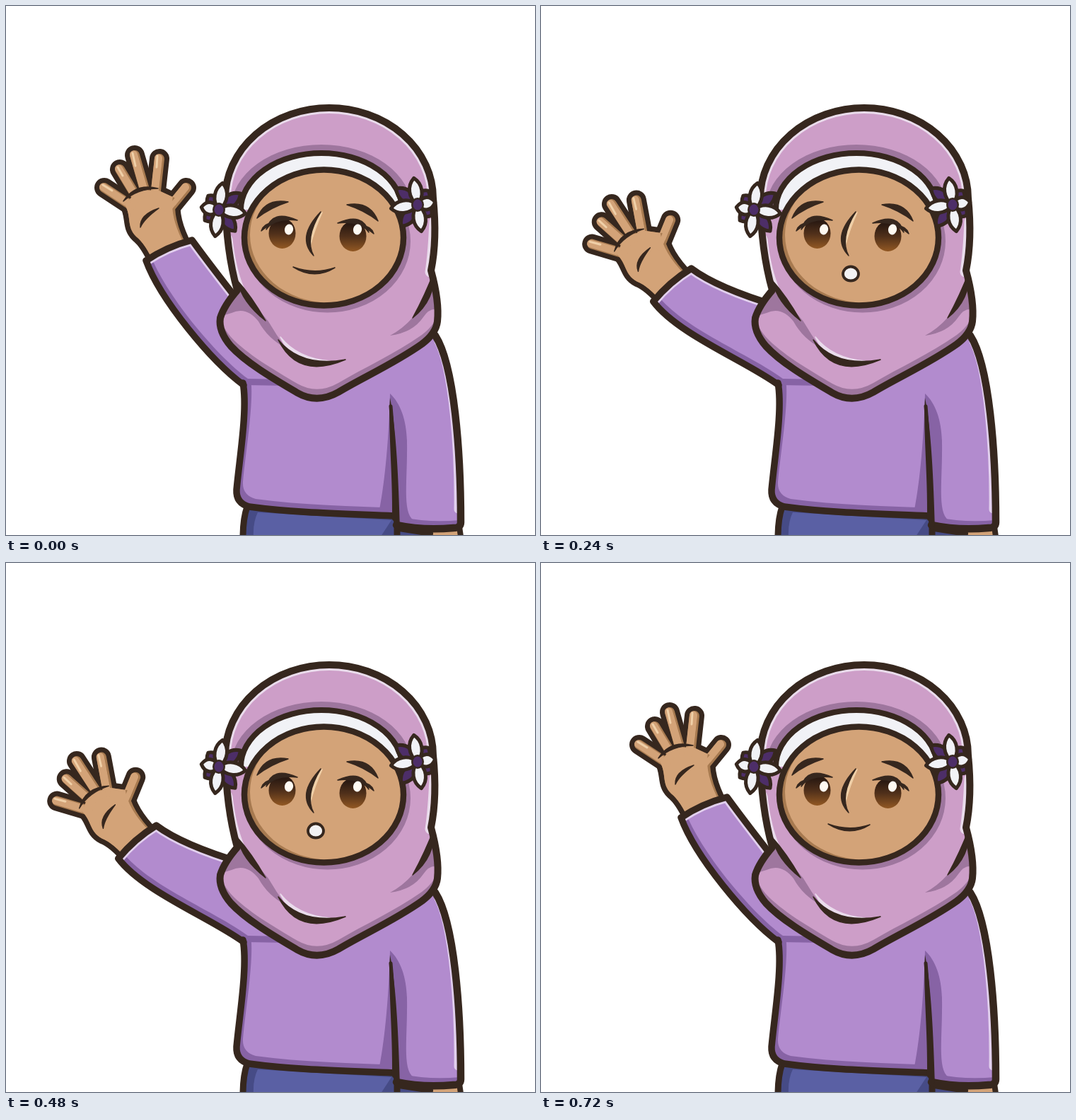
Animation, 748 px wide and 748 px high, one loop 840 ms. Source, as an HTML page with a canvas:

```html
<!DOCTYPE html>
<html lang="en">
<head>
<meta charset="utf-8">
<title>Waving girl</title>
<style>
  html, body { margin: 0; width: 100%; height: 100%; overflow: hidden; background: #fff; }
  canvas { display: block; }
</style>
</head>
<body>
<canvas id="stage" width="748" height="748"></canvas>
<script>
const ctx = document.getElementById('stage').getContext('2d');
const INK = '#36271e', SKIN = '#d3a378', SKIN_SHADE = '#a77a50', SKIN_LIGHT = '#f0d0a8';
const SWEATER = '#b28bce', SWEATER_SHADE = '#8763a5', SWEATER_LIGHT = '#e2d0ee';
const SCARF = '#cd9ec8', SCARF_SHADE = '#9e769e', SCARF_LIGHT = '#eadcec';
const PLUM = '#4d2e68', WHITE = '#f1f2f6', PANTS = '#5a60a4', PANTS_SHADE = '#464b86';

const STEP = 120, STEPS = 7;
const SHOULDER = { x: 372, y: 520 };
const SWING = -8.5 * Math.PI / 180;

const DOME = 'M310,272 A147,128 0 0 1 604,272';
const SCARF_SHAPE = new Path2D(DOME + ' Q610,330 601,374 Q613,418 610,446 Q608,463 588,478' +
  ' C550,505 505,525 470,546 Q440,563 412,547 C380,528 340,505 318,481' +
  ' Q300,460 303,441 Q308,424 327,402 Q311,345 310,272 Z');
const SIDE = 'C342,570 330,640 326,684 Q325,703 344,708 C410,717 480,718 548,721';
const RIGHT_ARM = 'M607,466 C634,508 643,630 643,730 Q643,738 633,738 Q590,742 552,734';
const BODY = new Path2D(`M337,537 ${SIDE} L552,734 Q590,742 633,738 Q643,738 643,730` +
  ' C643,630 634,508 607,466 L500,430 L400,450 Z');
const PALM = new Path2D('M210,365 Q197,336 184,326 C170,312 178,298 168,281 L185,262 L214,260' +
  ' L240,272 Q235,300 256,340 Z');
const FACE = new Path2D();
FACE.ellipse(449.5, 327.5, 112.5, 96, 0, 0, Math.PI * 2);

function fill(path, color) {
  ctx.fillStyle = color;
  ctx.fill(path instanceof Path2D ? path : new Path2D(path));
}
function line(path, width, color = INK) {
  ctx.lineWidth = width;
  ctx.strokeStyle = color;
  ctx.stroke(path instanceof Path2D ? path : new Path2D(path));
}
function scoped(draw, clip) {
  ctx.save();
  if (clip) ctx.clip(clip);
  draw();
  ctx.restore();
}
function dot(x, y, rx, ry, color, angle = 0) {
  const path = new Path2D();
  path.ellipse(x, y, rx, ry, angle, 0, Math.PI * 2);
  fill(path, color);
}
// Base colour pushed aside, so that shade shows along the opposite edge.
function shaded(path, base, shade, dx, dy) {
  fill(path, shade);
  scoped(() => {
    ctx.translate(dx, dy);
    fill(path, base);
  }, path);
}
// Curved stroke that tapers to a point at both ends.
function brush(x0, y0, cx, cy, x1, y1, width, color = INK) {
  const len = Math.hypot(x1 - x0, y1 - y0);
  const nx = (y0 - y1) / len * width, ny = (x1 - x0) / len * width;
  const path = new Path2D(`M${x0},${y0} Q${cx + nx},${cy + ny} ${x1},${y1}` +
    ` Q${cx - nx},${cy - ny} ${x0},${y0} Z`);
  fill(path, color);
  line(path, 1.5, color);
}

function drawHand(angle) {
  const fingers = ['M180,284 L139,257', 'M187,274 L161,231', 'M199,270 L182,211',
    'M211,270 L217,216', 'M228,290 L255,257'];
  scoped(() => {
    ctx.translate(SHOULDER.x, SHOULDER.y);
    ctx.rotate(angle);
    ctx.translate(-SHOULDER.x, -SHOULDER.y);
    line(PALM, 15);
    for (const finger of fingers) line(finger, 28);
    for (const finger of fingers) {
      line(finger, 14, SKIN_SHADE);
      scoped(() => {
        ctx.translate(-1.5, -1);
        line(finger, 11, SKIN);
      });
    }
    shaded(PALM, SKIN, SKIN_SHADE, -4, -3);
    for (const finger of fingers) line(finger, 7, SKIN);
    line('M137,253 L150,261 M158,228 L165,240 M179,208 L183,226 M214,212 L213,228', 3, SKIN_LIGHT);
    brush(166, 276, 184, 254, 215, 258, 4.5);
    brush(190, 313, 192, 298, 216, 286, 4.5);
  });
}

function drawSleeve(angle) {
  const cos = Math.cos(angle), sin = Math.sin(angle);
  const swing = (x, y) => {
    const dx = x - SHOULDER.x, dy = y - SHOULDER.y;
    return `${SHOULDER.x + dx * cos - dy * sin},${SHOULDER.y + dx * sin + dy * cos}`;
  };
  const cuff = swing(198, 360);
  const lower = `M336,536 C290,502 ${swing(218, 415)} ${cuff}`;
  const upper = `Q${swing(228, 340)} ${swing(263, 331)} Q${swing(290, 368)} 334,424`;
  const sleeve = new Path2D(`${lower} ${upper} L400,430 L400,537 Z`);
  shaded(sleeve, SWEATER, SWEATER_SHADE, 6, -9);
  scoped(() => line(`M${cuff} ${upper}`, 15, SWEATER_LIGHT), sleeve);
  line(`${lower} ${upper}`, 9.5);
}

function drawPants() {
  fill('M338,706 L335,750 L590,750 V716 Z', PANTS_SHADE);
  fill('M356,716 L545,727 L530,750 H350 Q349,730 356,716 Z', PANTS);
  line('M341,708 Q335,725 335,752 M553,730 V752', 9);
  fill('M590,736 H642 V750 H596 Z', SKIN);
  line('M556,739 L600,746 M641,736 L643,750', 8);
}

function drawBody(angle) {
  drawPants();
  shaded(BODY, SWEATER, SWEATER_SHADE, 9, -11);
  scoped(() => {
    fill('M543,548 C541,620 535,680 526,722 H552 L550,600 Z', SWEATER_SHADE);
    fill('M543,548 C558,562 566,585 567,615 C568,670 560,715 576,727 L550,740 Z', SWEATER_SHADE);
    line('M611,474 C632,515 640,630 639,712', 11, SWEATER_LIGHT);
  }, BODY);
  drawSleeve(angle);
  line(`M335,533 ${SIDE}`, 9.5);
  line(RIGHT_ARM, 10.5);
  fill('M543,554 C552,600 555,670 557,738 L546,726 C547,660 540,600 543,554 Z', INK);
  line('M544,566 C549,620 550,670 551,730', 5);
}

function drawScarf() {
  shaded(SCARF_SHAPE, SCARF, SCARF_SHADE, 0, -13);
  scoped(() => {
    line(DOME, 16, SCARF_LIGHT);
    line('M606,305 Q604,350 600,376 M313,330 Q318,375 331,404', 15, SCARF_LIGHT);
    fill('M318,288 A128,92 0 0 1 574,288 Z', SCARF_SHADE);
    fill('M326,398 Q352,422 371,446 Q382,465 396,484 Q370,470 357,446 Q340,424 319,434 L306,438 Z',
      SCARF_SHADE);
    fill('M543,466 Q578,448 606,395 L612,430 Q600,425 590,440 Q575,462 543,466 Z', SCARF_SHADE);
    ctx.translate(5, 5);
    line(FACE, 10, SCARF_SHADE);
  }, SCARF_SHAPE);
  brush(327, 388, 340, 414, 367, 445, 8);
  brush(605, 376, 600, 412, 575, 441, 8);
  brush(388, 468, 410, 504, 458, 502, 6, SCARF_LIGHT);
  brush(385, 472, 415, 520, 480, 500, 9);
  line(SCARF_SHAPE, 10);
}

function drawEye() {
  const iris = ctx.createLinearGradient(0, 301, 0, 343);
  iris.addColorStop(0.1, '#2b1a12');
  iris.addColorStop(0.5, '#50301a');
  iris.addColorStop(1, '#925823');
  brush(355, 300, 370, 278, 399, 277, 8);
  dot(390.5, 321.5, 19, 21.5, iris);
  brush(368, 316, 378, 293, 412, 303, 6.5);
  brush(361, 318, 366, 310, 376, 307, 3);
}

function drawMouth(openness) {
  if (openness === 0) {
    brush(406, 369, 436, 384, 465, 370, 4);
    return;
  }
  const mouth = new Path2D(openness === 2
    ? 'M427,379 A11,10.5 0 1 1 449,379 A11,9.5 0 0 1 427,379 Z'
    : 'M417,376 Q438,371 460,375 Q453,386 438,386 Q424,386 417,376 Z');
  fill(mouth, '#f3f2f3');
  line(mouth, 3.8);
}

function drawFace(openness) {
  const band = 'M332,288 A114,80 0 0 1 560,288';
  fill(band, WHITE);
  line(band, 8);
  shaded(FACE, SKIN, SKIN_SHADE, 8, -4);
  line(FACE, 8.5);

  drawEye();
  scoped(() => {
    ctx.translate(881, 4);
    ctx.scale(-1, 1);
    drawEye();
  });
  for (const x of [400, 497]) dot(x, 316, 6, 7.5, '#fffaf2', 0.25);

  brush(447, 292, 432, 315, 430, 340, 4, SKIN_LIGHT);
  brush(445, 291, 416, 328, 435, 353, 6);
  drawMouth(openness);
}

function drawPetal(angle, color) {
  // Petals on the outer side are seen foreshortened.
  const length = Math.cos(angle) > -0.5 ? 38 : 25;
  scoped(() => {
    ctx.rotate(angle);
    const petal = new Path2D(`M0,0 C${length * 0.3},-12 ${length * 0.75},-11 ${length},0` +
      ` C${length * 0.75},11 ${length * 0.3},12 0,0 Z`);
    fill(petal, color);
    line(petal, 5);
  });
}

function drawFlower(x, y, facing) {
  scoped(() => {
    ctx.translate(x, y);
    ctx.scale(facing, 1);
    for (const [tilt, color] of [[0.92, PLUM], [0.14, WHITE]]) {
      for (let i = 0; i < 4; i++) drawPetal(tilt + i * Math.PI / 2, color);
    }
    dot(0, 0, 9, 10, INK);
    dot(0, 0, 6.5, 7.5, PLUM);
  });
}

function render(now) {
  const step = Math.floor(now / STEP) % STEPS;
  // The arm goes down and back up, easing off slightly at the turn.
  const openness = 3 - Math.abs(step - 3);
  const angle = SWING * Math.min(openness, 2.1 - openness * 0.05);
  ctx.fillStyle = '#fff';
  ctx.fillRect(0, 0, 748, 748);
  ctx.lineCap = ctx.lineJoin = 'round';
  drawHand(angle);
  drawBody(angle);
  drawScarf();
  drawFace(openness);
  drawFlower(301, 288, 1);
  drawFlower(582, 281, -1);
}

const start = performance.now();
function tick() {
  render(performance.now() - start);
  requestAnimationFrame(tick);
}
tick();
</script>
</body>
</html>
```
